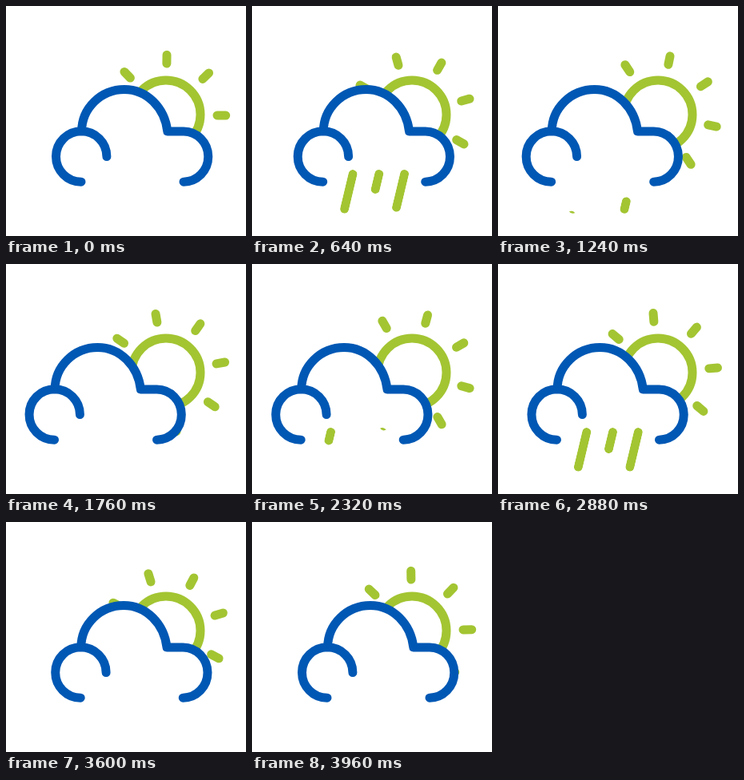
Animation, 300 px wide and 288 px high, one loop 4 s. Source, as an HTML page with a canvas:

```html
<!DOCTYPE html>
<html lang="en">
<head>
<meta charset="utf-8">
<title>Sun, cloud and rain</title>
<style>
  html, body { margin: 0; width: 100%; height: 100%; overflow: hidden; background: #fff; }
  canvas { display: block; }
</style>
</head>
<body>
<canvas id="stage" width="300" height="288"></canvas>
<script>
const ctx = document.getElementById('stage').getContext('2d');
const GREEN = '#a3c532', BLUE = '#0058b4';
const LOOP = 4000, STEP = 40, WIDTH = 11;
const SUN = { x: 200, y: 136, radius: 43, rayStart: 64, rayEnd: 74.7 };

// One capsule per drop: top centre, full length, delay in ms
const DROPS = [
  { x: 131.3, y: 210.5, length: 56, delay: 0 },
  { x: 164, y: 210.5, length: 32.7, delay: 80 },
  { x: 195.8, y: 210.5, length: 56, delay: 80 }
];
const SHOWERS = [{ enter: 270, leave: 957 }, { enter: 2150, leave: 2922 }];
const FALL_TIME = 370, FALL_DISTANCE = 56, SLANT = 0.234;

const LEFT_TO_RIGHT = 'A53.4 52.7 0 0 1 148 104.5C176 104.5 198.5 127.5 201.8 157' +
  'H222A30.8 31.6 0 0 1 222 220.2';
const cloudOutline = new Path2D(
  'M94 220.2A31.7 31.7 0 1 1 125.9 188.5M94.6 157' + LEFT_TO_RIGHT);
const cloudBody = new Path2D(
  'M94 220.2A31.7 31.7 0 0 1 94.6 157' + LEFT_TO_RIGHT + 'Z');

function ease(u) {
  u = Math.min(1, Math.max(0, u));
  return u < 0.5 ? 4 * u ** 3 : 1 - 4 * (1 - u) ** 3;
}

function drawSun(time) {
  ctx.save();
  ctx.translate(SUN.x, SUN.y);
  ctx.strokeStyle = GREEN;
  ctx.beginPath();
  ctx.arc(0, 0, SUN.radius, 0, 2 * Math.PI);
  ctx.stroke();
  ctx.rotate((0.8 + 180 * time / LOOP) * Math.PI / 180);
  for (let i = 0; i < 8; i++) {
    ctx.beginPath();
    ctx.moveTo(SUN.rayStart, 0);
    ctx.lineTo(SUN.rayEnd, 0);
    ctx.stroke();
    ctx.rotate(Math.PI / 4);
  }
  ctx.restore();
}

function drawCloud() {
  ctx.fillStyle = '#fff';
  ctx.fill(cloudBody);
  ctx.strokeStyle = BLUE;
  ctx.stroke(cloudOutline);
}

// A capsule slides through a fixed window of the same shape
function drawDrop(drop, shift) {
  const capsule = top => {
    ctx.beginPath();
    ctx.roundRect(-WIDTH / 2, top - WIDTH / 2, WIDTH, drop.length, WIDTH / 2);
  };
  ctx.save();
  ctx.translate(drop.x, drop.y);
  ctx.rotate(SLANT);
  capsule(0);
  ctx.clip();
  capsule(shift);
  ctx.fillStyle = GREEN;
  ctx.fill();
  ctx.restore();
}

function drawRain(time) {
  for (const { enter, leave } of SHOWERS) {
    for (const drop of DROPS) {
      const local = time - drop.delay;
      const progress = ease((local - enter) / FALL_TIME) + ease((local - leave) / FALL_TIME) - 1;
      if (Math.abs(progress) < 1) drawDrop(drop, progress * FALL_DISTANCE);
    }
  }
}

function draw(now) {
  const time = Math.floor(now % LOOP / STEP) * STEP;
  const swing = (time + STEP) % LOOP / (LOOP / 2);
  ctx.clearRect(0, 0, 300, 288);
  ctx.lineWidth = WIDTH;
  ctx.lineCap = ctx.lineJoin = 'round';
  drawSun(time);
  ctx.save();
  ctx.translate(-33.6 * ease(swing < 1 ? swing : 2 - swing), 0);
  drawCloud();
  drawRain(time);
  ctx.restore();
  requestAnimationFrame(draw);
}
requestAnimationFrame(draw);
</script>
</body>
</html>
```
